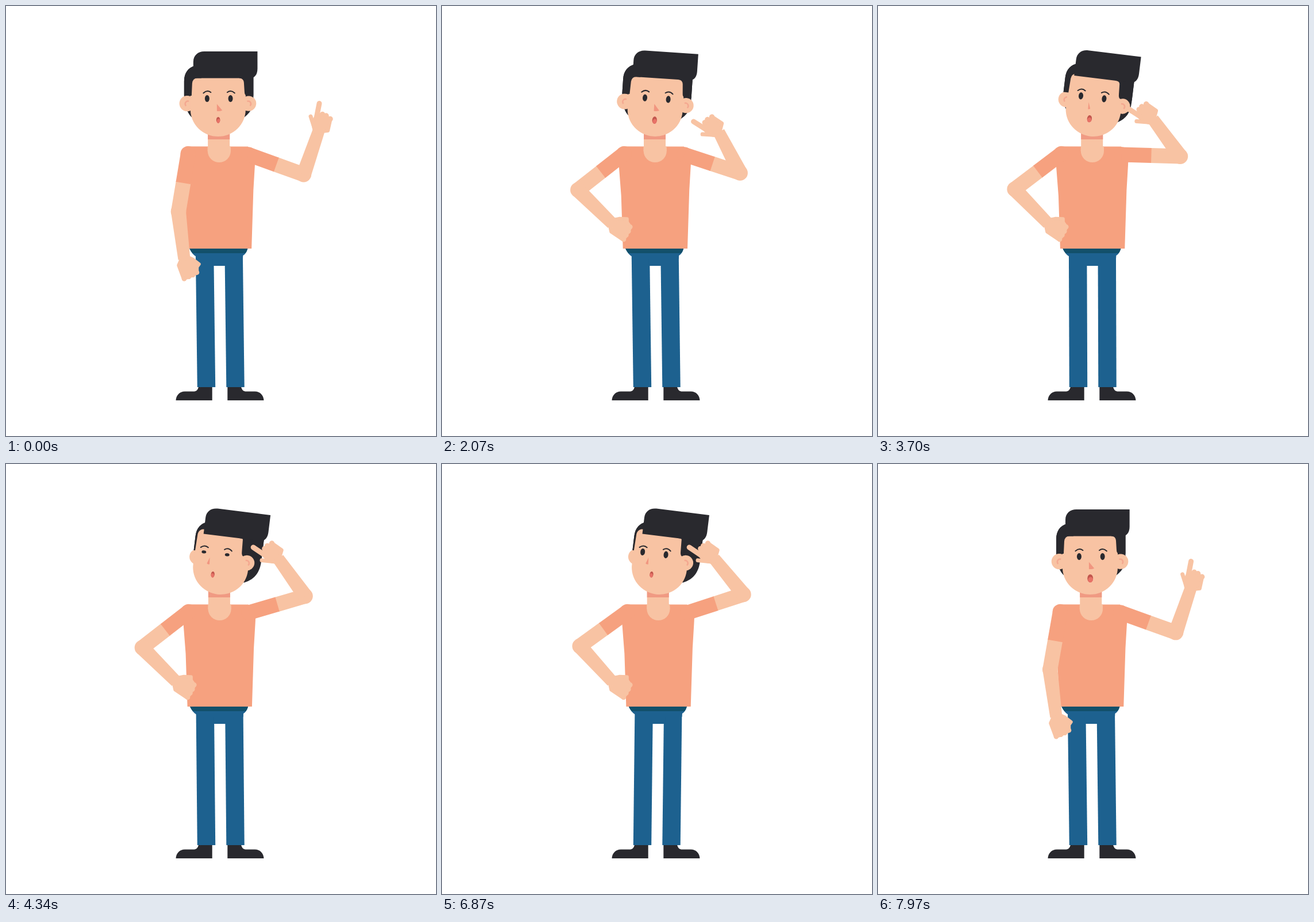
An HTML page with a canvas for the animation above (8 s loop, 748x748 px).

```html
<!DOCTYPE html>
<html lang="en">
<head>
<meta charset="utf-8">
<title>Thinking man</title>
<style>
html, body { margin: 0; width: 100%; height: 100%; overflow: hidden; background: #fff; }
canvas { display: block; width: 100vw; height: 100vh; }
</style>
</head>
<body>
<canvas id="stage" width="748" height="748"></canvas>
<script>
const ctx = document.getElementById('stage').getContext('2d');
const LOOP = 8000, TAU = Math.PI * 2;
const SKIN = '#f8c3a3', SHIRT = '#f6a17f', HAIR = '#29292e', JEANS = '#1d618f',
  BELT = '#12506b', BLUSH = '#f09a83', LIPS = '#c2564d', TONGUE = '#e87267';

// Wrist position and hand angle in each pose
const RIGHT = { point: [544, 217, 0], chin: [481.5, 219, -69], temple: [473.5, 164.5, -67] };
const LEFT = { down: [310, 440.5, 0], hip: [296, 378.5, -36] };

const mix = (a, b, k) => a + (b - a) * k;
const mixAll = (a, b, k) => a.map((v, i) => mix(v, b[i], k));

function ramp(t, from, to) {
  const k = Math.min(1, Math.max(0, (t - from) / (to - from)));
  return k * k * (3 - 2 * k);
}

function poly(points, color) {
  ctx.beginPath();
  points.forEach(([x, y]) => ctx.lineTo(x, y));
  ctx.closePath();
  ctx.fillStyle = color;
  ctx.fill();
}

function oval(x, y, rx, ry, color) {
  ctx.beginPath();
  ctx.ellipse(x, y, rx, ry, 0, 0, TAU);
  ctx.fillStyle = color;
  ctx.fill();
}

const dot = (x, y, r, color) => oval(x, y, r, r, color);

function line(a, b, width, color, cap = 'butt') {
  ctx.beginPath();
  ctx.moveTo(...a);
  ctx.lineTo(...b);
  ctx.lineWidth = width;
  ctx.lineCap = cap;
  ctx.strokeStyle = color;
  ctx.stroke();
}

function shape(d, color) {
  ctx.fillStyle = color;
  ctx.fill(new Path2D(d));
}

function softPoly(points, width) {
  poly(points, SKIN);
  ctx.lineJoin = 'round';
  ctx.lineWidth = width;
  ctx.strokeStyle = SKIN;
  ctx.stroke();
}

function shoe() {
  shape('M358.7 686H295.5C296 677 302 670.5 311 670.5H326C331 670.5 334 668 335 662H358.7Z', HAIR);
}

function drawLegs(s) {
  shoe();
  ctx.save();
  ctx.translate(744, 0);
  ctx.scale(-1, 1);
  shoe();
  ctx.restore();
  for (const [top, foot] of [[330, 332.8], [380.6, 383.3]]) {
    poly([[top + s, 430], [top + 31.4 + s, 430], [foot + 31.4, 663], [foot, 663]], JEANS);
  }
  ctx.save();
  ctx.translate(s, 0);
  shape('M319.5 422H420.5C419 428 416 432 412.5 434L412 440H383V452H360V440H331V436C326 433 322 428 319.5 422Z', JEANS);
  shape('M319.5 422H420.5Q419 427 416.5 430H324.5Q321 426 319.5 422Z', BELT);
  ctx.restore();
}

function drawTorso(s) {
  ctx.save();
  ctx.translate(s, 0);
  poly([[317, 244.2], [421, 244.5], [434, 258], [433, 278], [430.5, 320], [427.3, 422],
    [315, 422], [312, 330], [308, 278], [305, 258]], SHIRT);
  ctx.fillStyle = SKIN;
  ctx.fillRect(350.8, 244, 40.2, 8.5);
  ctx.fillRect(351.3, 215, 38, 32);
  dot(371, 252, 20.1, SKIN);
  ctx.fillStyle = BLUSH;
  ctx.fillRect(351.3, 215, 38, 17);
  ctx.restore();
}

// Two-bone arm that bends at the elbow to reach the wrist
function drawArm(shoulder, [wx, wy, turn], upper, fore, hand) {
  const [sx, sy] = shoulder;
  const dx = wx - sx, dy = wy - sy;
  const dist = Math.min(Math.hypot(dx, dy), upper + fore - 0.1);
  const bend = Math.acos((upper ** 2 + dist ** 2 - fore ** 2) / (2 * upper * dist));
  const a = Math.atan2(dy, dx) + bend;
  const along = d => [sx + Math.cos(a) * d, sy + Math.sin(a) * d];
  const elbow = along(upper), cuff = along(51.5);

  line(along(50), elbow, 26, SKIN);
  dot(...elbow, 13.3, SKIN);
  const f = Math.atan2(wy - elbow[1], wx - elbow[0]);
  const nx = -Math.sin(f), ny = Math.cos(f);
  const [ex, ey] = elbow;
  poly([[ex + nx * 13, ey + ny * 13], [wx + nx * 10.5, wy + ny * 10.5],
    [wx - nx * 10.5, wy - ny * 10.5], [ex - nx * 13, ey - ny * 13]], SKIN);
  dot(sx, sy, 13.3, SHIRT);
  line(shoulder, cuff, 26, SHIRT);

  ctx.save();
  ctx.translate(wx, wy);
  ctx.rotate(turn * Math.PI / 180);
  hand();
  ctx.restore();
}

function fist() {
  softPoly([[-9.5, 10.5], [-1, 33.5], [6, 31.5], [22, 23.5], [22, 13.5], [25.5, 8.5], [15, 0.5], [7, -3], [-6, 2.5]], 6.5);
  [[0, 34], [8, 30.5], [15, 27.5], [22, 23]].forEach(([x, y]) => dot(x, y, 4.3, SKIN));
}

function pointer() {
  softPoly([[-10, -14], [-8, -3], [-6, 2], [7, 1], [16, 0], [20.5, -20], [5, -28], [-4, -26]], 6);
  line([1, -47.5], [-4, -22], 9, SKIN, 'round');
  line([-14, -25], [-8, -6], 7, SKIN, 'round');
  [[6.5, -28.5], [13, -26], [20, -20.5]].forEach(([x, y]) => dot(x, y, 4.7, SKIN));
}

function earMark(x, y, side) {
  ctx.beginPath();
  if (side < 0) ctx.arc(x, y, 4.7, 2.3, 5.1);
  else ctx.arc(x, y, 4.7, 4.3, 7.1);
  ctx.lineWidth = 2.6;
  ctx.lineCap = 'butt';
  ctx.strokeStyle = '#f4a890';
  ctx.stroke();
}

function brow(x, y, lean) {
  ctx.beginPath();
  ctx.moveTo(x - 6.5, y + 0.8 + lean);
  ctx.quadraticCurveTo(x, y - 4.6, x + 6.5, y + 0.8 - lean);
  ctx.lineWidth = 2;
  ctx.lineCap = 'round';
  ctx.strokeStyle = HAIR;
  ctx.stroke();
}

function drawMouth(x, y, open, k) {
  const rx = 3.1 + 1.9 * open, ry = 5.2 + 1.9 * open;
  ctx.save();
  ctx.beginPath();
  ctx.ellipse(x, y, rx, ry, 0, 0, TAU);
  ctx.clip();
  ctx.fillStyle = LIPS;
  ctx.fillRect(x - 8, y - 9, 16, 18);
  oval(x + 0.6 - k, y + ry * 0.45, rx * 0.9, ry * 0.8, TONGUE);
  ctx.restore();
}

// k turns the face from front (0) to its side (1)
function drawHead(s, tilt, k, lid, open) {
  ctx.save();
  ctx.translate(371 + s, 210);
  ctx.rotate(tilt);
  ctx.translate(-371, -210);

  const l = mix(310, 319, k), r = mix(430.5, 438, k), low = mix(194, 201, k);
  const crown = `V131C${l} 116 ${l + 7} 108 ${l + 18} 104`;
  shape(`M${l} 160${crown}H${r}V160
    C${r} 178 ${r - 6} ${low - 8} ${mix(414, 413, k)} ${low}H${mix(324, 350, k)}
    C${l + 8} 190 ${l + 2} 178 ${l} 160Z`, HAIR);

  const earL = mix(315.3, 326.5, k), earR = mix(422.2, 413.5, k), earY = mix(169.6, 166.5, k);
  dot(earL, earY, 13.6, SKIN);
  earMark(earL + 1.2, earY + 0.6, -1);
  shape(`M321 180V${mix(125, 134, k)}Q${mix(321, 322, k)} 118 333 117H417V180A48 47 0 0 1 321 180Z`, SKIN);

  // Sideburns and fringe around the forehead
  const inL = mix(324, 322.5, k), inR = mix(414, 401.5, k), top = mix(125.5, 117.5, k);
  shape(`M${l} 156${crown}H340V${top}H${inL + 9}Q${inL + 1} ${top} ${inL} ${top + 9}L${inL - 1} 156Z`, HAIR);
  shape(`M${inR - 8} 125.5Q${inR - 1 + k} 125.5 ${inR} ${mix(133, 127, k)}
    L${inR + 1} 149Q${inR + 1} 156 ${inR + 6} 156.5H${r}V110H${inR - 8}Z`, HAIR);
  ctx.save();
  ctx.translate(6.5 * k, 0);
  shape('M326 125.6V97C326 86 334 79 345 79H437.6V109C437.6 119 433 125.6 424 125.6Z', HAIR);
  ctx.restore();

  dot(earR, earY, 13.2, SKIN);
  earMark(earR - 0.8, earY + 0.6, 1);

  const fx = -13 * k, fy = -4.3 * k;
  for (const x of [350, 390.7]) oval(x + fx, 161 + fy, 4, 6.1 * lid, HAIR);
  brow(350 + fx, 150 - 2 * k, 0.6);
  brow(391.5 + fx, 150 - 2 * k, -0.6);

  const [ax, ay, bx, by, cx, cy] =
    mixAll([367, 170.5, 376.3, 181.5, 367, 182.7], [348.3, 165, 344.5, 176, 349.2, 176.8], k);
  shape(`M${ax} ${ay}L${bx} ${by}Q${(bx + cx) / 2} ${cy + 1} ${cx} ${cy}Z`, '#f19680');
  drawMouth(mix(369.3, 357, k), mix(198.2, 193.8, k) + open * 0.8, open, k);
  ctx.restore();
}

function draw(t) {
  const s = 3.25 * (1 - Math.cos((t - 100) / 2000 * TAU)) - 0.3;
  const raise = ramp(t, 0, 800), lean = ramp(t, 1680, 2420);
  const turn = ramp(t, 3350, 4150), back = ramp(t, 7170, 8000);
  const k = turn * (1 - back);
  const tilt = 7 * Math.PI / 180 * lean * (1 - back);
  const lid = Math.max(0.12, Math.min(1, Math.abs(t - 4280) / 145));
  const open = Math.sqrt(Math.sin(t % 300 / 300 * Math.PI)) * (1 - k);

  const right = mixAll(mixAll(mixAll(RIGHT.point, RIGHT.chin, raise), RIGHT.temple, turn), RIGHT.point, back);
  const left = mixAll(LEFT.down, LEFT.hip, raise * (1 - back));

  ctx.fillStyle = '#fff';
  ctx.fillRect(0, 0, 748, 748);
  drawLegs(s);
  drawTorso(s);
  drawArm([317 + s, 257], left, 102, 83.5, fist);
  drawHead(s, tilt, k, lid, open);
  drawArm([422 + s, 258.5], right, 102, 80.5, pointer);
}

const start = performance.now();
function tick() {
  draw((performance.now() - start) % LOOP);
  requestAnimationFrame(tick);
}
tick();
</script>
</body>
</html>
```
